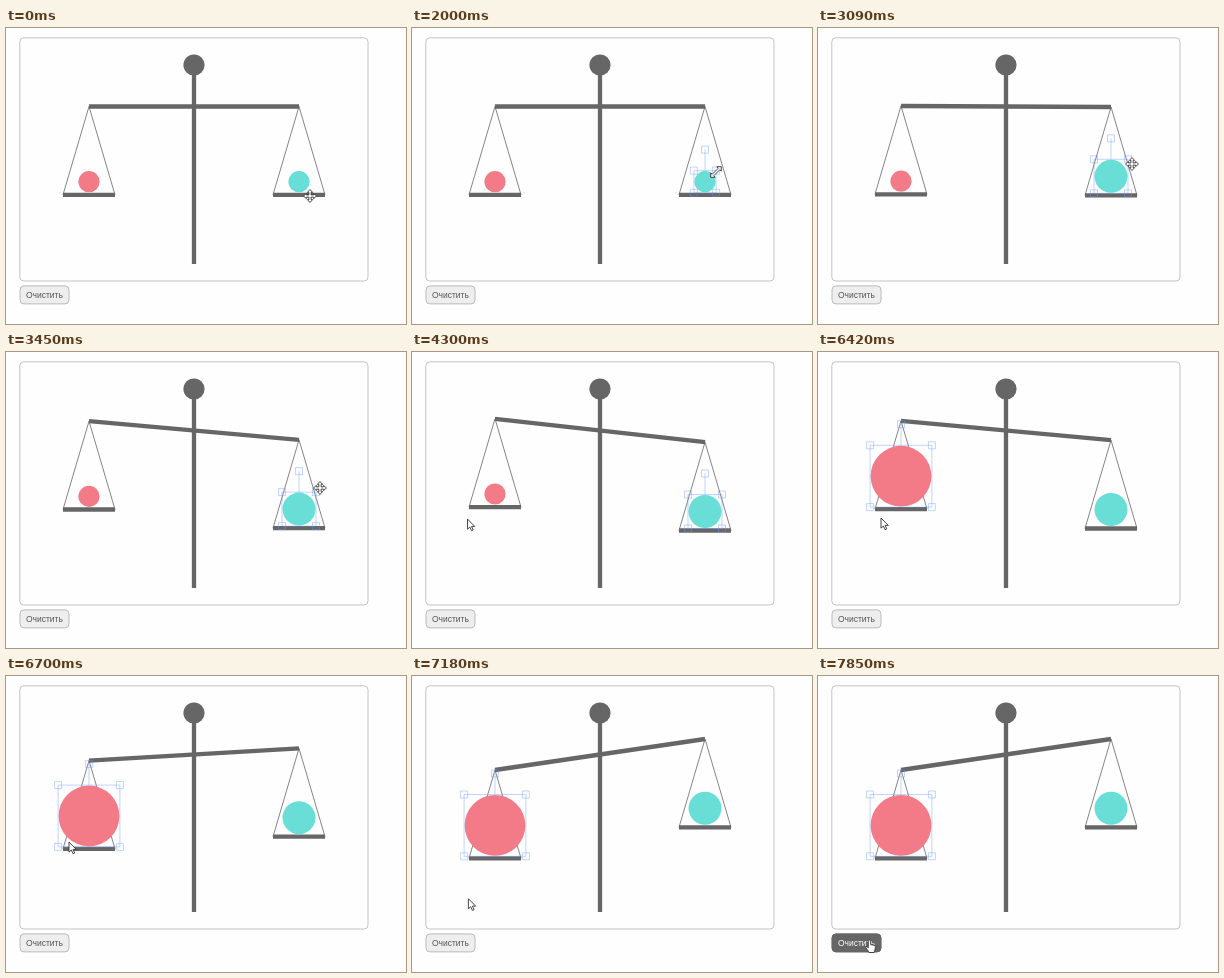
An HTML page that plays this animation: 400 by 296 pixels, repeating every 8 s.

```html
<!DOCTYPE html>
<html lang="ru">
<head>
<meta charset="utf-8">
<title>Весы</title>
<style>
  html, body { margin: 0; width: 100%; height: 100%; overflow: hidden; background: #fefefe; }
  svg { display: block; width: 400px; height: 296px; }
  .iron { stroke: #666; stroke-width: 4.3; fill: none; }
  .string { stroke: #666; stroke-width: .8; fill: none; }
  .box { stroke: #6699ff; stroke-opacity: .5; stroke-width: .8; fill: none; }
  .cursor { fill: #fff; stroke: #333; stroke-width: .9; stroke-linejoin: round; }
  text { font: 8.5px "Liberation Sans", Arial, sans-serif; text-anchor: middle; }
</style>
</head>
<body>
<svg viewBox="0 0 400 296">
  <rect x="13.8" y="9.8" width="348.2" height="243.2" rx="4" fill="#fefefe" stroke="#c4c4c4"/>

  <g>
    <rect x="14" y="257.9" width="49" height="18" rx="4" fill="#eee" stroke="#bbb"/>
    <text x="38.4" y="269.8" fill="#555">Очистить</text>
  </g>
  <g id="hover">
    <rect x="14" y="257.9" width="49" height="18" rx="4" fill="#666" stroke="#666"/>
    <text x="38.4" y="269.8" fill="#fff">Очистить</text>
  </g>

  <path class="iron" d="M188 37V236"/>
  <circle cx="188" cy="37" r="10.6" fill="#666"/>
  <path class="iron" id="beam"/>
  <path class="string" id="leftString"/>
  <path class="string" id="rightString"/>
  <path class="iron" id="leftPan"/>
  <path class="iron" id="rightPan"/>
  <circle id="pink" cx="83" fill="#f37b88"/>
  <circle id="teal" cx="293" fill="#68ded7"/>
  <path class="box" id="box"/>

  <g class="cursor" id="cursor">
    <path id="move" d="M0-6.5 2.6-3.6H1.1V-1.1H3.6V-2.6L6.5 0 3.6 2.6V1.1H1.1V3.6H2.6L0 6.5-2.6 3.6H-1.1V1.1H-3.6V2.6L-6.5 0-3.6-2.6V-1.1H-1.1V-3.6H-2.6Z"/>
    <path id="resize" d="M5.3-5.3V-.8L3.8-2.3-2.3 3.8-.8 5.3H-5.3V.8L-3.8 2.3 2.3-3.8.8-5.3Z"/>
    <path id="arrow" d="M0 0V10.2L2.4 8 4 11.7 5.7 11 4.1 7.4H7.3Z"/>
    <path id="hand" d="M-1.2 6V.2Q0-1.3 1.2.2V4.2L2.6 4.4 4.2 4.8 5.4 5.3Q6 5.6 5.9 7L5.4 9.6 4.6 12H-.6L-1.6 10-3.8 7.2Q-3.9 5.6-2.4 6.2L-1.2 7.3Z"/>
  </g>
</svg>

<script>
const LOOP = 8000, LEFT = 83, RIGHT = 293, BEAM_Y = 78.5, DROP = 88.3;
const $ = id => document.getElementById(id);
const span = (t, from, to) => Math.min(1, Math.max(0, (t - from) / (to - from)));
const mix = (a, b, u) => a + (b - a) * u;
const smooth = u => u * u * (3 - 2 * u);
const sineIn = u => 1 - Math.cos(u * Math.PI / 2);

// Pointer stops: time, x, y
const stops = [
  [30, 304, 168], [350, 298, 160], [940, 298, 160], [1390, 304, 144],
  [2880, 304, 144], [3020, 314, 136], [3450, 314, 136], [3640, 261, 162],
  [3850, 50, 171], [4270, 50, 171], [4390, 83, 147], [4880, 83, 147],
  [5210, 74, 152], [5970, 74, 152], [6290, 63, 166], [6790, 63, 166],
  [7500, 51.5, 264.5]
];
const shapes = [
  [0, "move"], [1200, "resize"], [3020, "move"], [3520, "arrow"],
  [4340, "move"], [5080, "resize"], [6290, "arrow"], [7430, "hand"]
];

function pointer(t) {
  const next = stops.findIndex(s => s[0] > t);
  if (next === 0) return stops[0].slice(1);
  if (next < 0) return stops[stops.length - 1].slice(1);
  const a = stops[next - 1], b = stops[next];
  const u = smooth(span(t, a[0], b[0]));
  return [mix(a[1], b[1], u), mix(a[2], b[2], u)];
}

function drawPan(side, x, top) {
  const y = top + DROP;
  $(side + "String").setAttribute("d", `M${x - 26} ${y}L${x} ${top}L${x + 26} ${y}`);
  $(side + "Pan").setAttribute("d", `M${x - 26} ${y}H${x + 26}`);
}

function drawBall(id, top, r) {
  const y = top + DROP - r - 2.5;
  $(id).setAttribute("cy", y);
  $(id).setAttribute("r", r);
  return y;
}

function boxPath(x, y, r) {
  const h = r + .5, top = y - h, knob = top - 21;
  const handle = (cx, cy) => `M${cx - 3.5} ${cy - 3.5}h7v7h-7z`;
  return `M${x - h} ${top}h${2 * h}v${2 * h}h${-2 * h}zM${x} ${top}V${knob}`
    + handle(x - h, top) + handle(x + h, top)
    + handle(x - h, y + h) + handle(x + h, y + h) + handle(x, knob);
}

function draw(t) {
  const tilt = 11.7 * sineIn(span(t, 2990, 3520)) - 27.2 * sineIn(span(t, 6290, 6820));
  const leftY = BEAM_Y - tilt, rightY = BEAM_Y + tilt;
  $("beam").setAttribute("d", `M${LEFT} ${leftY}L${RIGHT} ${rightY}`);
  drawPan("left", LEFT, leftY);
  drawPan("right", RIGHT, rightY);

  const pinkR = mix(10.6, 30.4, smooth(span(t, 5970, 6290)));
  const tealR = mix(10.6, 16.5, smooth(span(t, 2880, 3020)));
  const pinkY = drawBall("pink", leftY, pinkR);
  const tealY = drawBall("teal", rightY, tealR);
  $("box").setAttribute("d",
    t < 400 ? "" : t < 4390 ? boxPath(RIGHT, tealY, tealR) : boxPath(LEFT, pinkY, pinkR));

  $("hover").setAttribute("opacity", span(t, 7450, 7800));
  $("cursor").setAttribute("transform", `translate(${pointer(t)})`);
  const shape = shapes.filter(s => s[0] <= t).pop()[1];
  for (const node of $("cursor").children) {
    node.style.display = node.id === shape ? "" : "none";
  }
}

const start = performance.now();
function tick() {
  draw((performance.now() - start) % LOOP);
  requestAnimationFrame(tick);
}
tick();
</script>
</body>
</html>
```
